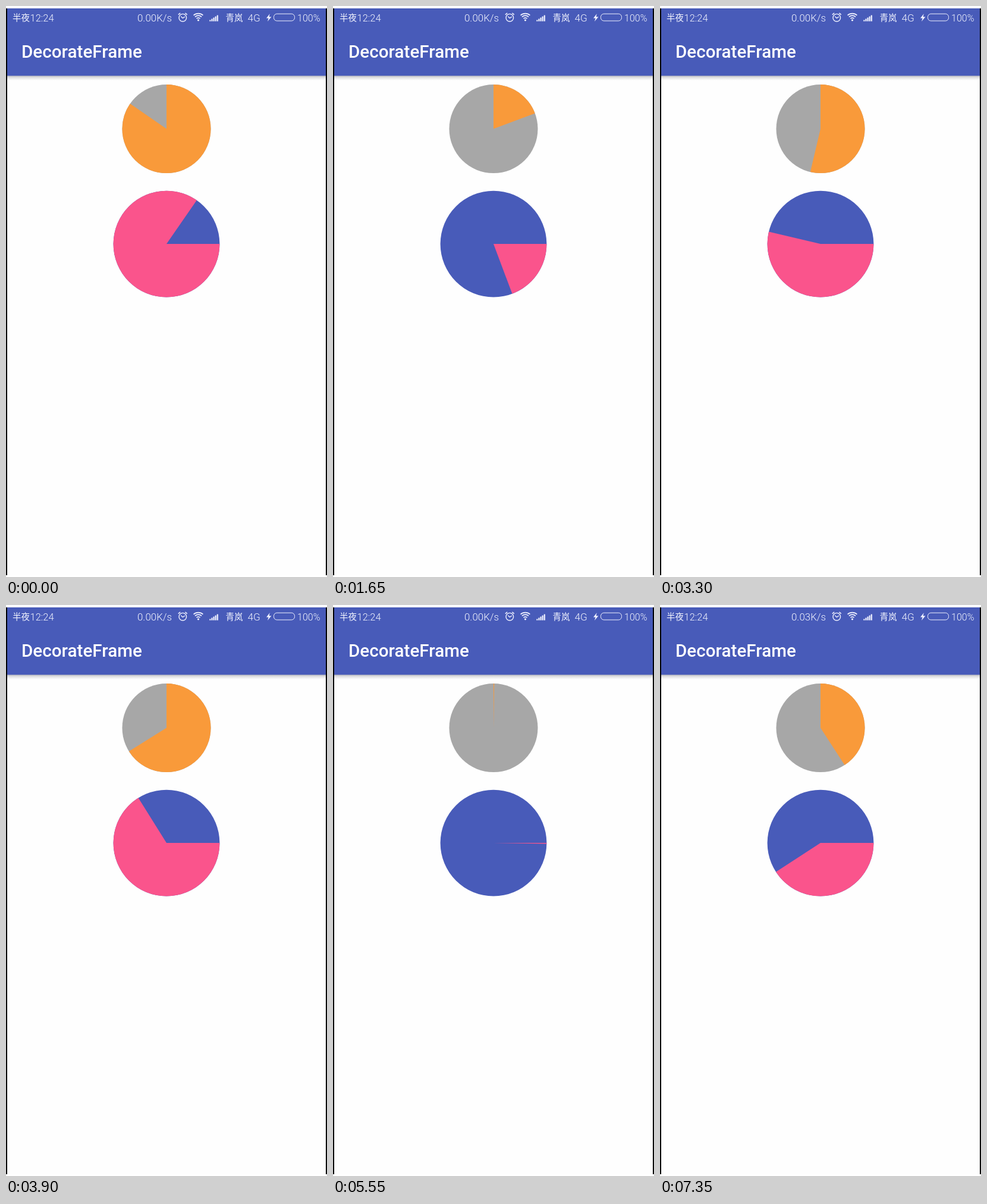
Animation, 540 px wide and 960 px high, one loop 7.5 s. Source, as an HTML page with a canvas:

```html
<!DOCTYPE html>
<html lang="zh">
<head>
<meta charset="utf-8">
<title>DecorateFrame</title>
<style>
  html, body { margin: 0; width: 100%; height: 100%; overflow: hidden; background: #fff; }
  canvas, svg { position: absolute; left: 0; top: 0; width: 540px; height: 960px; }
  text { font-family: Roboto, "Noto Sans CJK SC", "Noto Sans CJK", sans-serif; fill: #fff; }
  .status { font-weight: 300; fill: #f4f6ff; }
  .cjk { font-family: "Noto Sans CJK SC", "Noto Sans CJK", sans-serif; font-size: 14.5px; }
  .title { font-size: 29.6px; font-weight: 500; }
</style>
</head>
<body>
<canvas id="stage" width="540" height="960"></canvas>
<svg viewBox="0 0 540 960">
  <text class="status cjk" x="11" y="25.3">半夜</text>
  <text class="status" x="40.5" y="25.5" font-size="16.5">12:24</text>
  <text class="status" id="speed" x="221" y="25.5" font-size="16.9">0.00K/s</text>
  <text class="status cjk" x="369.5" y="25.3">青岚</text>
  <text class="status" x="406.5" y="25.5" font-size="17.2">4G</text>
  <text class="status" x="490" y="25.5" font-size="16">100%</text>
  <text class="title" x="26" y="87.2">DecorateFrame</text>
</svg>
<script>
const LOOP = 7500, STEP = 150;
const BLUE = '#485bb9', PINK = '#fa548c', ORANGE = '#f99a3a', GREY = '#a7a7a7', INK = '#f0f2ff';
// [time in ms, sweep in degrees]
const SWEEP = [[0, -55.3], [750, 2], [1650, 69.4], [3300, 193.3], [4650, 293.8], [5550, 360.9], [7350, 507]];

const ctx = document.getElementById('stage').getContext('2d');
const speed = document.getElementById('speed');

function sweepAt(t) {
  const i = Math.max(1, SWEEP.findIndex(k => k[0] >= t));
  const [t0, a0] = SWEEP[i - 1], [t1, a1] = SWEEP[i];
  const deg = a0 + (a1 - a0) * (t - t0) / (t1 - t0);
  return (deg + 360) % 360;
}

function rect(x, y, w, h, color) {
  ctx.fillStyle = color;
  ctx.fillRect(x, y, w, h);
}

function line(width, ...pts) {
  ctx.lineWidth = width;
  ctx.beginPath();
  pts.forEach(([x, y]) => ctx.lineTo(x, y));
  ctx.stroke();
}

function arc(x, y, r, from, to, width) {
  ctx.lineWidth = width;
  ctx.beginPath();
  ctx.arc(x, y, r, from * Math.PI, to * Math.PI);
  ctx.stroke();
}

function dot(x, y, r, color) {
  ctx.fillStyle = color;
  ctx.beginPath();
  ctx.arc(x, y, r, 0, Math.PI * 2);
  ctx.fill();
}

function pie(x, y, r, start, sweep, back, front) {
  dot(x, y, r, back);
  const from = start * Math.PI / 180;
  ctx.fillStyle = front;
  ctx.beginPath();
  ctx.moveTo(x, y);
  ctx.arc(x, y, r, from, from + sweep * Math.PI / 180);
  ctx.fill();
}

function alarm() {
  arc(297.3, 19.7, 6.3, 0, 2, 1.4);
  line(1.3, [294.2, 17.6], [297.3, 20.4], [301, 18]);
  line(1.5, [289.8, 14.6], [293.2, 11.8]);
  line(1.5, [301.4, 11.8], [304.8, 14.6]);
}

function wifi() {
  [[4.6, 1.6], [8.4, 1.7], [12, 1.7]].forEach(([r, w]) => arc(323.5, 24.6, r, 1.27, 1.73, w));
  dot(323.5, 23.8, 1.6, INK);
}

function signal() {
  for (let i = 0; i < 5; i++) rect(342.3 + i * 3.1, 23.5 - i * 2, 2.2, 2.2 + i * 2, INK);
}

function battery() {
  ctx.fillStyle = INK;
  ctx.beginPath();
  [[443.8, 13], [438, 20.4], [441.6, 20.4], [440, 26], [446.4, 18.2], [442.6, 18.2]]
    .forEach(([x, y]) => ctx.lineTo(x, y));
  ctx.fill();
  ctx.lineWidth = 1;
  ctx.beginPath();
  ctx.roundRect(450.5, 13.2, 35, 11.8, 5.2);
  ctx.stroke();
}

function chrome() {
  rect(0, 0, 540, 960, '#fff');
  rect(0, 4, 540, 953, '#000');
  rect(2, 4, 536, 953, '#fefefe');
  const shade = ctx.createLinearGradient(0, 117, 0, 125);
  shade.addColorStop(0, '#b9b9bd');
  shade.addColorStop(0.4, '#e0e0e2');
  shade.addColorStop(1, '#fefefe');
  rect(2, 117, 536, 8, shade);
  rect(2, 4, 536, 113.3, BLUE);
  ctx.strokeStyle = INK;
  alarm();
  wifi();
  signal();
  battery();
}

function draw(t) {
  const sweep = sweepAt(t);
  chrome();
  pie(270, 206.6, 74.5, -90, sweep, GREY, ORANGE);
  pie(270, 400.1, 89.4, 0, sweep, BLUE, PINK);
  speed.textContent = t < 6900 ? '0.00K/s' : '0.03K/s';
}

const begin = performance.now();
function tick() {
  const t = (performance.now() - begin) % LOOP;
  draw(Math.floor(t / STEP) * STEP);
  requestAnimationFrame(tick);
}
tick();
</script>
</body>
</html>
```
